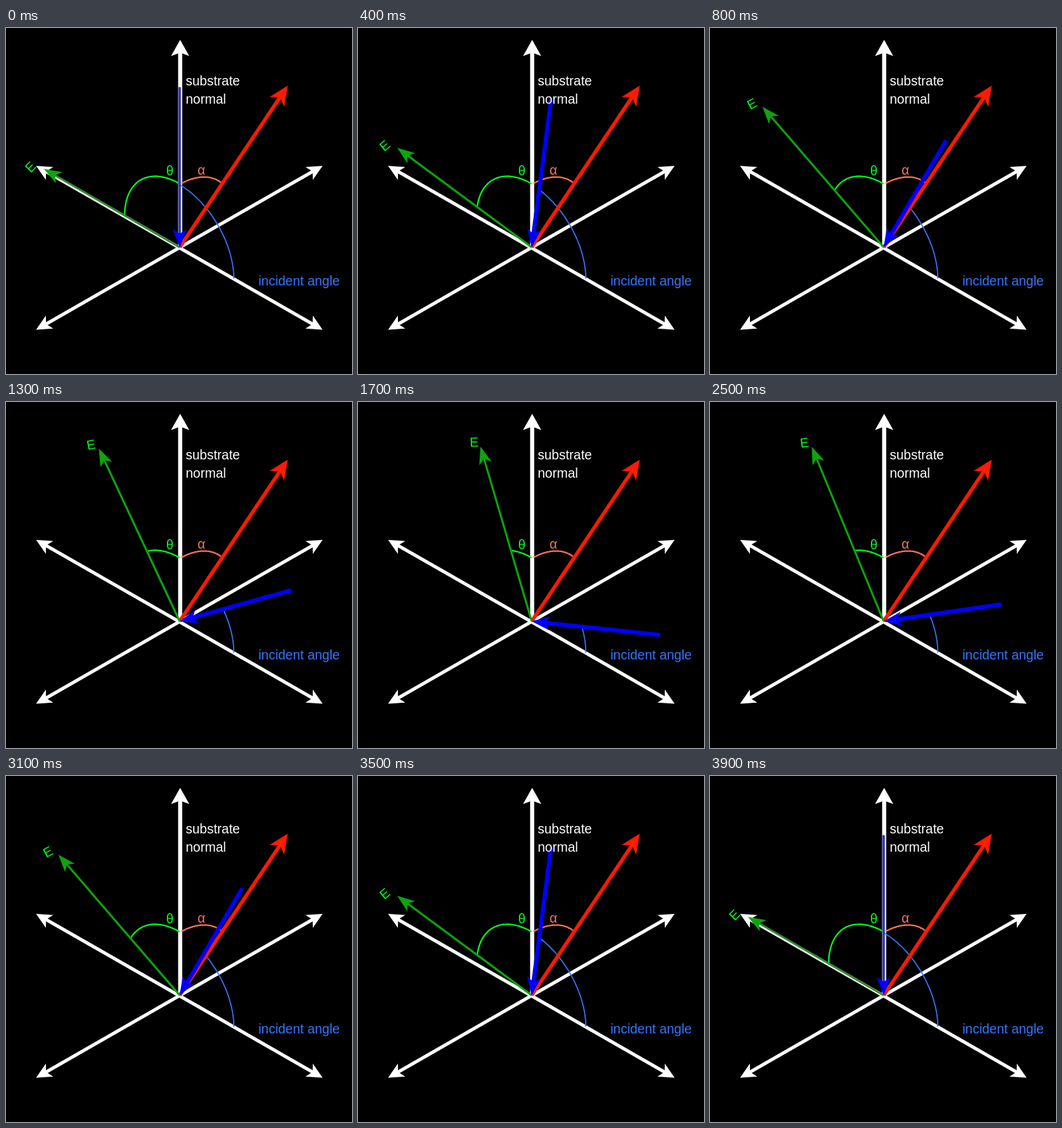
Write an HTML page with a canvas that moves like this. It is 512 px wide and 512 px high and loops after 4 s.

```html
<!DOCTYPE html>
<html lang="en">
<head>
<meta charset="utf-8">
<style>
  html, body { margin: 0; height: 100%; overflow: hidden; background: #000; }
  canvas { display: block; }
</style>
</head>
<body>
<canvas id="stage" width="512" height="512"></canvas>
<script>
const ctx = document.getElementById('stage').getContext('2d');
const ORIGIN = [257, 324.5];
const FLOOR = [256.5, 325.2];
const RAD = Math.PI / 180;
const MAX_TILT = 70, ALPHA = 51.5;
const STEP = 100, LAST = 19;

// Isometric projection: right and left run along the floor, up is the normal.
const project = (right, left, up) => [
  ORIGIN[0] + (right + left) * Math.cos(30 * RAD),
  ORIGIN[1] + (right - left) / 2 - up
];

// Points at an angle from the normal, in the three planes that are used.
const beamAt = (deg, r) => project(r * Math.sin(deg * RAD), 0, r * Math.cos(deg * RAD));
const fieldAt = (deg, r) => project(-r * Math.cos(deg * RAD), 0, r * Math.sin(deg * RAD));
const columnAt = (deg, r) => project(0, r * Math.sin(deg * RAD), r * Math.cos(deg * RAD));

function arrow(from, to, color, width, barb, spread, notch, shaftColor = color) {
  const angle = Math.atan2(to[1] - from[1], to[0] - from[0]);
  const length = Math.hypot(to[0] - from[0], to[1] - from[1]);
  ctx.save();
  ctx.translate(...to);
  ctx.rotate(angle);
  ctx.fillStyle = shaftColor;
  ctx.fillRect(-length, -width / 2, length - notch + 2, width);
  ctx.fillStyle = color;
  ctx.beginPath();
  ctx.moveTo(0, 0);
  ctx.lineTo(-barb, -spread);
  ctx.lineTo(-notch, 0);
  ctx.lineTo(-barb, spread);
  ctx.fill();
  ctx.restore();
}

function arc(pointAt, from, to, radius, color, width) {
  ctx.beginPath();
  for (let i = 0; i <= 40; i++) {
    ctx.lineTo(...pointAt(from + (to - from) * i / 40, radius));
  }
  ctx.strokeStyle = color;
  ctx.lineWidth = width;
  ctx.stroke();
}

function label(text, x, y, color) {
  ctx.fillStyle = color;
  ctx.fillText(text, x, y);
}

function draw(progress) {
  const ease = progress * progress * (3 - 2 * progress);
  const tilt = MAX_TILT * ease;
  const aligned = progress === 0;

  ctx.fillStyle = '#000';
  ctx.fillRect(0, 0, 512, 512);

  for (const dx of [-212, 212]) {
    for (const dy of [-121.3, 121.3]) {
      arrow(FLOOR, [FLOOR[0] + dx, FLOOR[1] + dy], '#fff', 5, 23, 11, 17);
    }
  }
  arrow([257.7, 325], [257.7, 17.5], '#fff', 6, 24, 13.5, 19);

  arc(fieldAt, tilt, 90, 94, '#00ff1a', 2.2);
  arc(columnAt, 2, ALPHA, 93, '#ff7356', 2.2);
  arc(beamAt, tilt, 90, 92.5, '#3377ff', 1.7);

  arrow(ORIGIN, columnAt(ALPHA, 236), '#ff1a00', 5.5, 29, 13, 21);
  // Shafts half sink into the axes while they coincide.
  const tip = fieldAt(tilt, 232);
  arrow(ORIGIN, tip, '#0ca50c', 3, 26, 9.5, 19, aligned ? '#2f8a2f' : '#0ca50c');
  arrow(beamAt(tilt, 237), ORIGIN, '#0000ff', aligned ? 3.5 : 6, 27, 10.5, 20,
    aligned ? '#3030b4' : '#0000ff');

  ctx.font = '19.5px "Liberation Sans", Arial, sans-serif';
  ctx.textAlign = 'left';
  ctx.textBaseline = 'alphabetic';
  label('substrate', 266, 85, '#fff');
  label('normal', 266, 112, '#fff');
  label('incident angle', 373.5, 380.5, '#3377ff');
  label('θ', 237, 218, '#00ff1a');
  label('α', 283.5, 216.5, '#ff7356');

  ctx.save();
  ctx.translate(tip[0] - 20 + 11 * ease, tip[1] - 3 - 4 * ease);
  ctx.rotate(-46 * (1 - ease) * RAD);
  ctx.textAlign = 'center';
  label('E', 0, 7, '#00ff1a');
  ctx.restore();
}

function tick(now) {
  const step = Math.floor(now / STEP) % (2 * LAST + 2);
  draw(Math.min(step, 2 * LAST + 1 - step) / LAST);
  requestAnimationFrame(tick);
}
tick(0);
</script>
</body>
</html>
```
